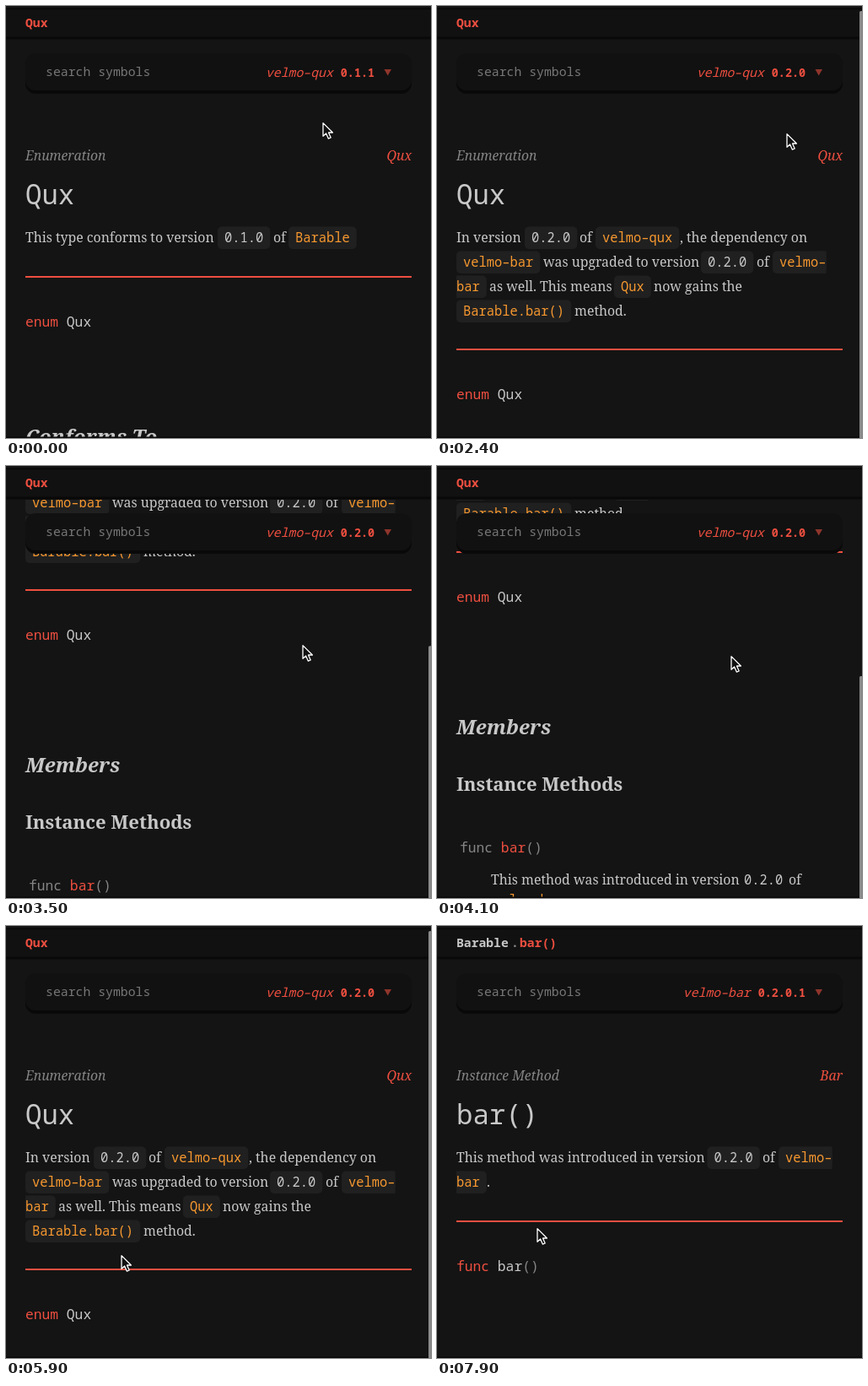
Write an HTML page that moves like this. It is 504 px wide and 512 px high and loops after 8000 ms.

```html
<!DOCTYPE html>
<html lang="en">
<head>
<meta charset="utf-8">
<title>Symbol docs</title>
<style>
  html, body { margin: 0; width: 100%; height: 100%; overflow: hidden; background: #141414; }
  svg { display: block; }
  text { fill: #c8c8c8; white-space: pre; }
  .serif { font: 15.8px "Noto Serif", serif; }
  .kind { font: italic 15.7px "Noto Serif", serif; }
  .h2 { font: italic 600 24px "Noto Serif", serif; }
  .h3 { font: 600 22.1px "Noto Serif", serif; }
  .mono { font: 14.8px "Noto Sans Mono", monospace; }
  .code { font: 15.4px "Noto Sans Mono", monospace; }
  .decl { font: 16.3px "Noto Sans Mono", monospace; }
  .title { font: 32.3px "Noto Sans Mono", monospace; }
  .ver { font: bold 13.4px "Noto Sans Mono", monospace; }
  .tab { font: bold 14.7px "Noto Sans Mono", monospace; }
  .pkg { font: italic 14.8px "Noto Sans Mono", monospace; }
  .end { text-anchor: end; }
  .red { fill: #ee4f40; }
  .gray { fill: #858585; }
  .dim { fill: #777; }
  .orange { fill: #f7982f; }
</style>
</head>
<body>
<svg width="504" height="512" viewBox="0 0 504 512">
  <g id="page"></g>
  <path fill="#141414" d="M0 0H504V40H0Z"/>
  <path fill="#111" d="M0 4H504V37H0Z"/>
  <path fill="#090909" d="M0 2.5H504V4H0ZM0 36.5H504V39.5H0ZM0 510.5H504V512H0Z"/>
  <g id="tab"></g>
  <rect x="23" y="60" width="458" height="44" rx="12" fill="#090909"/>
  <rect x="23" y="56" width="458" height="44" rx="12" fill="#111"/>
  <text class="mono dim" x="47" y="83">search symbols</text>
  <g id="picker"></g>
  <path fill="#8f352c" d="M448.5 75H457L452.7 82.5Z"/>
  <g id="menu">
    <rect x="389" y="112" width="89" height="72" rx="8" fill="#090909"/>
    <rect x="389" y="108" width="89" height="72" rx="8" fill="#111"/>
    <text class="ver gray" x="397" y="134">0.1.1</text>
    <text class="ver" id="pick" x="397" y="161">0.2.0</text>
  </g>
  <rect id="thumb" x="501" width="4" height="700" rx="1.5" fill="#8a8a8a"/>
  <g id="cursor">
    <path fill="#111" stroke="#fff" stroke-width="1.3" stroke-linejoin="round"
      d="M0 .6V16.3L3.6 13L6.4 19.2L9.2 18L6.5 12H11.4Z"/>
    <path fill="#fff" stroke="#111" stroke-width=".5"
      d="M-1 1Q.5-1 2 1V6Q4 5 5.5 6.2Q7.5 5.5 8.5 7.2Q12 6.7 12 9.5V12.5Q12 14.5 10.5 16V18.5H1V16Q-2 13.5-4.5 11Q-5.5 9-3 8.8L-1 10.5Z"/>
    <path fill="none" stroke="#ddd" d="M.5 .5Q3.5 .5 3.5 3V14Q3.5 16.5 .5 16.5M6.5 .5Q3.5 .5 3.5 3M3.5 14Q3.5 16.5 6.5 16.5"/>
  </g>
</svg>
<script>
const $ = id => document.getElementById(id);
const text = (cls, x, y, s) => `<text class="${cls}" x="${x}" y="${y}">${s}</text>`;
const span = (cls, s) => `<tspan class="${cls}">${s}</tspan>`;
const serif = (x, y, s) => text('serif', x, y, s);

// Inline code box; cut = 1 has a flat right side, cut = -1 a flat left side without padding.
function chip(x, y, s, cls = '', cut = 0) {
  const pad = cut < 0 ? 0 : 8, w = s.length * 9.25 + pad + (cut > 0 ? 0 : 8);
  const box = (bx, bw, r) => `<rect x="${bx}" y="${y - 18.5}" width="${bw}" height="26.5" rx="${r}" fill="#202020"/>`;
  const flat = cut ? box(cut > 0 ? x + w - 10 : x, 10, 0) : '';
  return box(x, w, 5) + flat + text('code ' + cls, x + pad, y, s);
}

const rule = y => `<path d="M23 ${y}H481" stroke="#ee4f40" stroke-width="2"/>`;
const head = (kind, module, title) => text('kind gray', 23, 183, kind) +
  text('kind red end', 481, 183, module) + text('title', 23, 235, title);
const picker = (pkg, ver) => text('pkg red end', 437 - ver.length * 8.04 - 9, 83.5, pkg) +
  text('ver red end', 437, 83.5, ver);

const enumDecl = span('red', 'enum') + ' Qux';
const quxTab = text('tab red', 23, 25, 'Qux');
const intro = 'This method was introduced in version';

const pages = [{
  tab: quxTab,
  picker: picker('velmo–qux', '0.1.1'),
  body: head('Enumeration', 'Qux', 'Qux') +
    serif(23, 280, 'This type conforms to version') + chip(251, 280, '0.1.0') +
    serif(317, 280, 'of') + chip(335, 280, 'Barable', 'orange') +
    rule(321) + text('decl', 23, 380, enumDecl) + text('h2', 23, 519, 'Conforms To')
}, {
  tab: quxTab,
  picker: picker('velmo–qux', '0.2.0'),
  body: head('Enumeration', 'Qux', 'Qux') +
    serif(23, 280, 'In version') + chip(104, 280, '0.2.0') + serif(169, 280, 'of') +
    chip(188, 280, 'velmo–qux', 'orange') + serif(288, 280, ', the dependency on') +
    chip(23, 309, 'velmo–bar', 'orange') + serif(126, 309, 'was upgraded to version') +
    chip(313, 309, '0.2.0') + serif(379, 309, 'of') + chip(398, 309, 'velmo–', 'orange', 1) +
    chip(23, 338, 'bar', 'orange', -1) + serif(62, 338, 'as well. This means') +
    chip(210, 338, 'Qux', 'orange') + serif(257, 338, 'now gains the') +
    chip(23, 367, 'Barable.bar()', 'orange') + serif(163, 367, 'method.') +
    rule(407) + text('decl', 23, 466, enumDecl) +
    text('h2', 23, 623, 'Members') + text('h3', 23, 690, 'Instance Methods') +
    text('decl gray', 27, 763, 'func ' + span('red', 'bar') + '()') +
    '<path id="link" d="M23 769.5H128" stroke="#999"/>' +
    serif(64, 801, intro) + text('code', 364, 801, '0.2.0') + serif(417, 801, 'of') +
    text('code orange', 67, 825, 'velmo–bar')
}, {
  tab: text('tab', 23, 25, 'Barable') + text('tab gray', 88, 25, '.') + text('tab red', 98, 25, 'bar()'),
  picker: picker('velmo–bar', '0.2.0.1'),
  body: head('Instance Method', 'Bar', 'bar()') +
    serif(23, 280, intro) + chip(320.5, 280, '0.2.0') + serif(386, 280, 'of') +
    chip(405, 280, 'velmo–', 'orange', 1) + chip(23, 309, 'bar', 'orange', -1) + serif(59, 309, '.') +
    rule(350) + text('decl', 23, 409, span('red', 'func') + ' bar' + span('gray', '()'))
}];

// Pointer steps: time, x, y, shape, page scroll
const ARROW = 0, HAND = 1, BEAM = 2, NONE = 3;
const steps = [
  [0, 376, 138, ARROW, 0], [400, 378, 133, ARROW, 0],
  [600, 394, 118, ARROW, 0], [700, 420, 92, ARROW, 0], [800, 435, 75, HAND, 0],
  [1400, 430, 95, ARROW, 0], [1500, 420, 131, ARROW, 0], [1600, 415, 151, HAND, 0],
  [2400, 415, 151, ARROW, 0], [2800, 366, 166, ARROW, 0],
  [3200, 363, 179, ARROW, 14], [3300, 360, 190, ARROW, 59], [3400, 356, 202, ARROW, 165],
  [3500, 352, 212, ARROW, 260], [3600, 349, 219, ARROW, 305],
  [4100, 349, 225, ARROW, 305], [4200, 315, 280, ARROW, 305], [4300, 272, 342, ARROW, 305],
  [4500, 249, 436, BEAM, 305], [4700, 0, 0, NONE, 305],
  [5300, 104, 492, ARROW, 305], [5400, 99, 475, ARROW, 305], [5500, 96, 460, HAND, 305],
  [5700, 100, 440, ARROW, 235], [5800, 121, 412, ARROW, 75], [5900, 137, 390, ARROW, 0],
  [6200, 151, 400, ARROW, 0], [6600, 142, 394, ARROW, 0], [6700, 121, 384, ARROW, 0],
  [6800, 100, 372, HAND, 0], [6900, 96, 362, HAND, 0], [7000, 115, 356, HAND, 0],
  [7300, 121, 356, HAND, 0], [7900, 119, 358, ARROW, 0]
];

const show = (el, on) => el.setAttribute('visibility', on ? 'visible' : 'hidden');
const shapes = [...$('cursor').children];
let current;

function draw(now) {
  const t = now % 8000, within = (a, b) => t >= a && t < b;
  const page = pages[t < 2300 ? 0 : t < 7800 ? 1 : 2];
  if (page !== current) {
    current = page;
    $('page').innerHTML = page.body;
    $('tab').innerHTML = page.tab;
    $('picker').innerHTML = page.picker;
  }
  const [, x, y, shape, scroll] = steps.findLast(s => s[0] <= t);
  $('page').setAttribute('transform', `translate(0 ${-scroll})`);
  $('cursor').setAttribute('transform', `translate(${x} ${y})`);
  shapes.forEach((el, i) => show(el, i === shape));
  show($('menu'), within(1100, 2300));
  $('pick').setAttribute('class', within(1600, 2300) ? 'ver red' : 'ver gray');
  show($('thumb'), within(2400, 7800));
  $('thumb').setAttribute('y', 6 + scroll * 0.797);
  if ($('link')) show($('link'), within(4300, 4500) || within(5500, 5700));
  requestAnimationFrame(() => draw(performance.now()));
}
draw(0);
</script>
</body>
</html>
```
